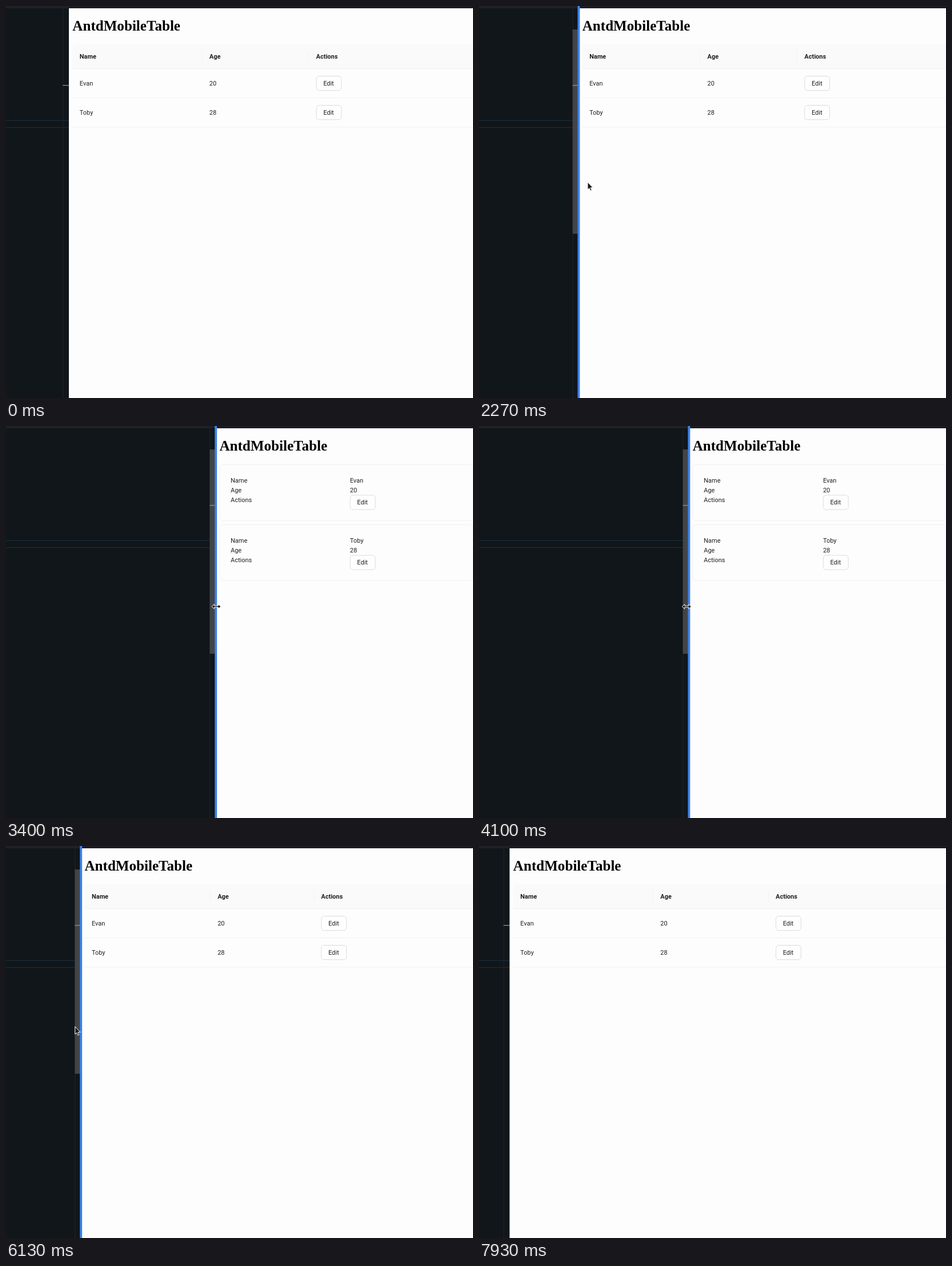
These frames come from a looping animation (817x685 px, 8 s). An HTML page:

```html
<!DOCTYPE html>
<html lang="en">
<head>
<meta charset="utf-8">
<title>AntdMobileTable</title>
<style>
html, body { margin: 0; width: 100%; height: 100%; overflow: hidden; background: #10161a; }
svg { display: block; }
text { font: 10.98px Roboto, sans-serif; fill: #1f1f1f; white-space: pre; }
.title { font: bold 25.1px "Liberation Serif", serif; fill: #000; }
.head { font-weight: 600; }
.btn { fill: #fefefe; stroke: #d9d9d9; stroke-width: .9; }
.card { fill: none; stroke: #f0f0f0; }
.rule { fill: #f0f0f0; }
.cursor { fill: #1c1c1c; stroke: #fff; stroke-width: 1; stroke-linejoin: round; }
</style>
</head>
<body>
<svg id="stage" width="817" height="685" viewBox="0 0 817 685"></svg>
<script>
const LOOP = 8000;
const PAD = 12.55;
const LINE = 17.1;
const TABLE_RIGHT = 824.5;
const CARD_RIGHT = 817.5;
const BREAKPOINT = 221;
const SASH = 6.2;   // from sash centre to page content
const LEAD = 75;    // the pane follows the pointer this much later, in ms
const LABELS = ["Name", "Age", "Actions"];
const ROWS = [["Evan", "20"], ["Toby", "28"]];

const stage = document.getElementById("stage");

function make(tag, attrs, parent = stage) {
  const el = document.createElementNS("http://www.w3.org/2000/svg", tag);
  for (const key in attrs) el.setAttribute(key, attrs[key]);
  return parent.appendChild(el);
}
const rect = (x, y, width, height, attrs, parent) =>
  make("rect", { x, y, width, height, ...attrs }, parent);
function text(str, x, y, cls, parent) {
  const el = make("text", { x, y, class: cls }, parent);
  el.textContent = str;
  return el;
}
const group = parent => make("g", {}, parent);
const move = (el, x, y = 0) =>
  el.setAttribute("transform", `translate(${x.toFixed(2)} ${y.toFixed(2)})`);
const show = (el, on) => el.setAttribute("visibility", on ? "visible" : "hidden");

function button(y, parent) {
  rect(.4, y, 43.8, 25, { rx: 4.7, class: "btn" }, parent);
  text("Edit", PAD, y + 16.3, "", parent);
}

const ramp = (t, from, to) => Math.min(1, Math.max(0, (t - from) / (to - from)));
const smooth = u => u * u * (3 - 2 * u);
const mix = (a, b, u) => a + (b - a) * u;

// Drag right, then drag back with growing speed
const dragOut = t => smooth(ramp(t, 1700, 3450));
const dragBack = t => ramp(t, 4090, 6650) ** 1.253;
const pane = t => mix(mix(116.3, 374, dragOut(t)), 59.8, dragBack(t));

function pointerAt(t) {
  const x = pane(t + LEAD) - SASH;
  const y = 315.5 - 11 * Math.sin(Math.PI * dragOut(t));
  const enter = 1 - (1 - ramp(t, 30, 830)) ** 2;
  const leave = smooth(ramp(t, 6800, 7920));
  return [mix(mix(575, x, enter), 815, leave), mix(mix(1, y, enter), 25, leave)];
}

// Editor
rect(0, 0, 817, 685, { fill: "#10161a" });
for (const y of [199.6, 212]) rect(0, y, 817, 1, { fill: "#1b3342" });
rect(0, 0, 817, 4, { fill: "#202127" });
const gutter = group();
rect(-17, 4, .9, 681, { fill: "#23272e" }, gutter);
const slider = rect(-17, 41, 9.4, 357, { fill: "#434448" }, gutter);
rect(-17, 138, 11, 1.3, { fill: "#8d9293" }, gutter);

// Preview page
const page = group();
rect(-6.3, 0, 830, 4, { fill: "#1d1a24" }, page);
rect(-6.3, 4, 830, 681, { fill: "#fdfdfd" }, page);
text("AntdMobileTable", 0, 43, "title", page);

const table = group(page);
make("path", { d: "M0 110V73.3Q0 67 6.3 67H830V110Z", fill: "#fafafa" }, table);
for (let i = 0; i < 3; i++) rect(0, 109.2 + 50.9 * i, 830, .9, { class: "rule" }, table);
const columns = LABELS.map((label, i) => {
  const col = group(table);
  text(label, PAD, 92, "head", col);
  if (i) rect(-.8, 79.5, .8, 17, { class: "rule" }, col);
  const cell = group(col);
  move(cell, PAD);
  ROWS.forEach((row, r) => {
    if (row[i]) text(row[i], 0, 139 + 51 * r, "", cell);
    else button(122.6 + 51 * r, cell);
  });
  return col;
});

const cards = group(page);
const values = group(cards);
const frames = ROWS.map((row, r) => {
  const top = 67 + 105 * r;
  const line = i => top + 32 + LINE * i;
  LABELS.forEach((label, i) => text(label, 19.6, line(i), "", cards));
  row.forEach((value, i) => text(value, 0, line(i), "", values));
  button(top + 54, values);
  return rect(.4, top + .3, 400, 97.8, { rx: 6.3, class: "card" }, cards);
});

const sash = rect(-8.2, 0, 3.9, 685, { fill: "#3b82ee" });

const pointer = group();
const arrow = make("path", {
  d: "M.5 0V13.4L3.5 10.7L5.5 15.2L7.7 14.2L5.7 9.9H9.8Z", class: "cursor"
}, pointer);
const resize = make("path", {
  d: "M-8 0L-3.5-4V-1.3H3.5V-4L8 0L3.5 4V1.3H-3.5V4Z", class: "cursor"
}, pointer);

function draw(t) {
  const left = pane(t);
  const [x, y] = pointerAt(t);

  for (const el of [gutter, page, sash]) move(el, left);
  show(table, left < BREAKPOINT);
  show(cards, left >= BREAKPOINT);
  columns.forEach((col, i) =>
    move(col, (TABLE_RIGHT - left) * (.3204 * i - .0283 * (i > 1 ? 2 : 0))));
  move(values, (CARD_RIGHT - left) / 2 + 6.3);
  for (const el of frames) el.setAttribute("width", CARD_RIGHT - left - .8);

  show(slider, t > 650 && t < 7250);
  show(sash, t > 1050 && t < 7050);

  const onSash = Math.abs(x - left + SASH) < 5.4;
  show(pointer, t >= 30 && t < 7920);
  arrow.style.display = onSash ? "none" : "";
  resize.style.display = onSash ? "" : "none";
  move(pointer, x, y);
}

const start = performance.now();
function tick() {
  draw((performance.now() - start) % LOOP);
  requestAnimationFrame(tick);
}
draw(0);
requestAnimationFrame(tick);
</script>
</body>
</html>
```
